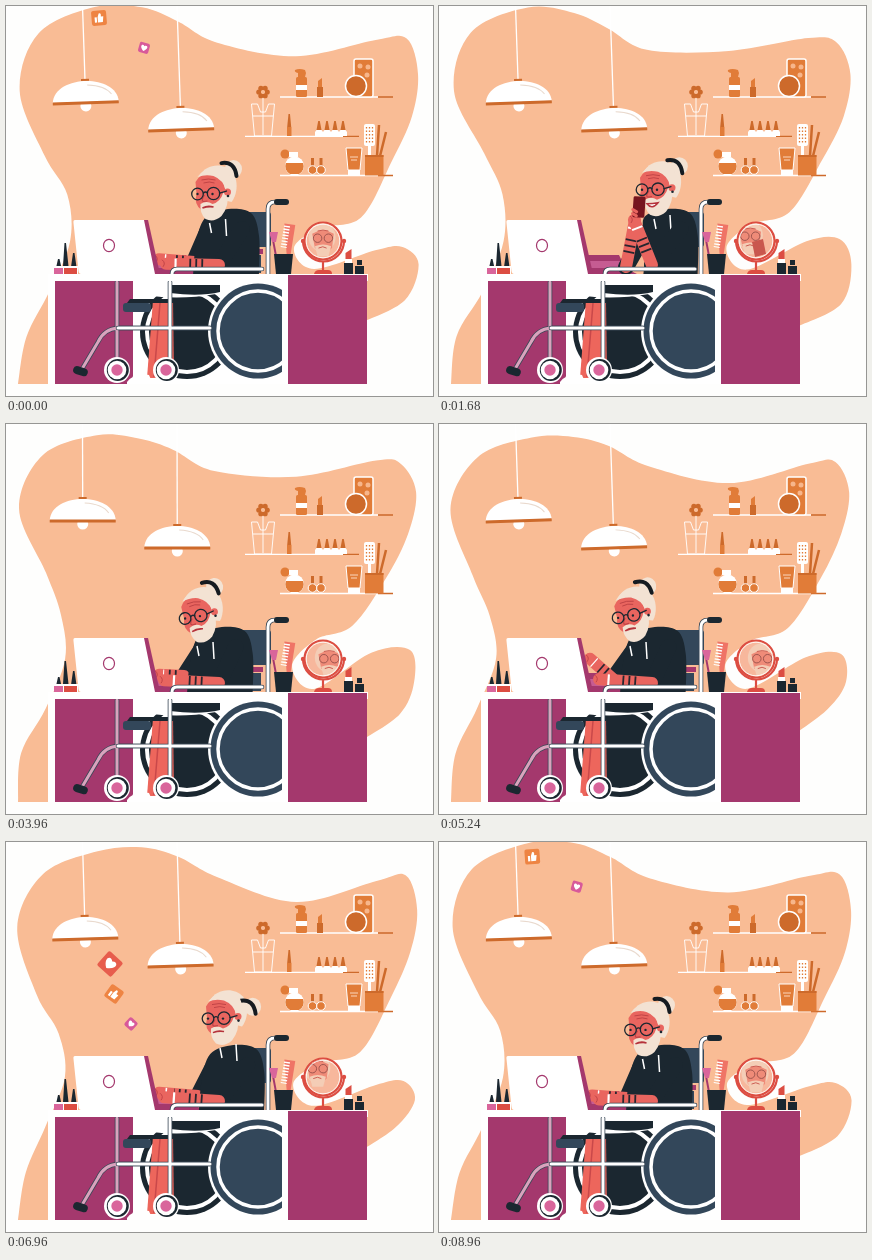
Recreate the animation shown at these times as an HTML page. Size 427x390 px, loop 9000 ms.

```html
<!DOCTYPE html>
<html lang="en">
<head>
<meta charset="utf-8">
<title>At the desk</title>
<style>
html, body { margin: 0; width: 100%; height: 100%; overflow: hidden; background: #fefefd; }
svg { display: block; width: 427px; height: 390px; }
.peach { fill: #f9bc95; }
.white { fill: #fff; }
.plum { fill: #a4386d; }
.navy { fill: #1b2730; }
.slate { fill: #33475a; }
.skin { fill: #e9655f; }
.hair { fill: #f3e2d3; }
.orange { fill: #e17c38; }
.rust { fill: #cd6a2b; }
.red { fill: #dc4d42; }
.line { fill: none; stroke: #fff; }
.tube, .core { fill: none; stroke-linecap: round; stroke-linejoin: round; }
.tube { stroke: #3a4856; stroke-width: 4.6; }
.core { stroke: #fff; stroke-width: 3; }
.ink { fill: none; stroke: #1b2730; stroke-width: 1.3; stroke-linecap: round; }
</style>
</head>
<body>
<svg viewBox="0 0 427 390">
  <defs>
    <g id="shade">
      <circle class="white" cy="26" r="5.5"/>
      <path class="white" d="M-33 22C-31-6 31-6 33 22z"/>
      <path class="rust" d="M-4-1h8v2h-8zM-33 21.500h66v3h-66z"/>
      <path d="M2 5Q20 6 26 15" fill="none" stroke="#e9d9cd"/>
    </g>
    <path id="heart" class="white" d="M0 5C-9-1-4-7 0-3C4-7 9-1 0 5z"/>
    <path id="thumb" class="white" d="M-5-1h2.500v6H-5zM-1.500-1L0-5Q3-6 2.200-1.500H5L4 5h-5.500z"/>
    <g id="caster">
      <circle class="white" r="13"/><circle class="navy" cx=".8" r="11"/>
      <circle class="white" r="9.300"/><circle r="5.700" fill="#d9659b"/>
    </g>
    <g id="polish">
      <path class="rust" d="M-.8-15h1.600l1.700 9h-5z"/><path class="white" d="M-2.500-6h5l1.500 2v4h-8v-4z"/>
    </g>
    <g id="drop">
      <path class="rust" d="M-1.500-17h3v8h-3z"/>
      <circle class="orange" cy="-5" r="4.300" stroke="#fff"/>
    </g>
    <clipPath id="glass"><circle cx="317" cy="235" r="17.500"/></clipPath>
  </defs>

  <path id="blob" class="peach"/>
  <g id="lamps"></g>

  <g id="shelves">
    <path class="line" d="M274 91h98M239 130.300h98M274 169.500h98" stroke-width="1.300"/>
    <path d="M372 91h15M337 130.300h16M372 169.500h15" stroke="#cd6a2b" stroke-width="1.300"/>
    <rect class="orange" x="290" y="71" width="11" height="20" rx="1.500"/>
    <path class="orange" d="M292 71v-4q-4-1-3-3 4-2 10 0l1 3-1 4z"/>
    <path class="white" d="M290 79h11v5h-11z"/>
    <path class="rust" d="M311 81h6v10h-6z"/><path class="orange" d="M312 81v-6l4-3v9z"/>
    <rect class="orange" x="348" y="53" width="19" height="38" rx="2" stroke="#fff" stroke-width="1.500"/>
    <g fill="#f7b68b"><circle cx="354" cy="60" r="2.500"/><circle cx="362" cy="61" r="2.500"/><circle cx="361" cy="69" r="2.500"/></g>
    <circle class="rust" cx="350" cy="80" r="10.500" stroke="#fff" stroke-width="1.500"/>

    <path class="line" d="M257 90V129M245.500 98h6l3 8h5l3-8h6l-3 32h-17zM247 110h20" stroke-width=".9"/>
    <g id="flower" class="rust"></g><circle class="peach" cx="257" cy="86" r="2"/>
    <path class="rust" d="M282.500 108h1.500l1.200 13h-4z"/><path class="orange" d="M281 121h4.500v9H281z"/>
    <g id="polishes"></g>

    <circle class="orange" cx="279" cy="148" r="4.500"/>
    <path class="white" d="M283 146h9v5h-9z"/>
    <circle class="white" cx="288.500" cy="160" r="9.500"/>
    <path class="orange" d="M280 157h17a8.500 8.500 0 0 1-4 11h-9a8.500 8.500 0 0 1-4-11z"/>
    <use href="#drop" x="306.500" y="169"/><use href="#drop" x="315" y="169"/>
    <path class="orange" d="M340 142h16l-2 22h-12z" stroke="#fff"/><path class="white" d="M342 164h12v5h-12z"/>
    <path d="M344 151h8M345 154h6" stroke="#fbd6bd"/>
    <rect class="white" x="358" y="118" width="11" height="22" rx="2"/>
    <path d="M360.500 121v17M363.500 121v17M366.500 121v17" stroke="#e17c38" stroke-width="1.300" stroke-dasharray="1.500 2"/>
    <path class="white" d="M362 140h3v10h-3z"/>
    <path d="M371 150l2-31M374 150l6-24" stroke="#cd6a2b" stroke-width="2.500"/>
    <path class="orange" d="M359 149h18.500v20.500H359z"/><path class="rust" d="M359 149h18.500v2H359z"/>
  </g>

  <g id="icons"></g>

  <g id="chairBack">
    <rect class="slate" x="232" y="206" width="33" height="35" rx="3"/>
    <path class="plum" d="M235 243h22v5h-22z"/>
    <path class="slate" d="M237 249h18v18h-18z"/>
    <path class="tube" d="M262 272V203Q262 196 269 196h4"/><path class="core" d="M262 272V203Q262 196 269 196h4"/>
    <rect class="navy" x="268" y="193" width="15" height="6" rx="3"/>
  </g>

  <path class="plum" d="M143 249h37l3 6h-38zM148 262h38l12 6h-49z"/>
  <path d="M145 255h38l3 7h-40z" fill="#c65c92"/>

  <g id="farArm"></g>
  <path id="body" class="navy"/>
  <g id="head">
    <path class="hair" d="M-6-18C0-30 18-32 27-22C34-12 31 2 26 8L18 6z"/>
    <g id="bun">
      <ellipse class="hair" cx="3" cy="1" rx="8.500" ry="9"/>
      <path d="M-9-5Q4-7 6 8" fill="none" stroke="#151b21" stroke-width="4" stroke-linecap="round"/>
    </g>
    <path class="skin" d="M-10-12Q-6-20 4-21L16-16Q21-8 20 8L14 18-4 16Q-12 10-9 0z"/>
    <path class="hair" d="M-8-17Q2-30 18-26Q28-20 26-3L20-4Q18-14 8-18Q0-20-8-17z"/>
    <path class="hair" d="M-5 10Q1 6 7 10Q15 8 18-2H22Q24 12 16 22Q8 29 0 25Q-6 19-5 10z"/>
    <circle class="skin" cx="22" cy="-2" r="3.500"/><circle class="navy" cx="22.500" cy="2" r="1.300"/>
    <path d="M-4-14q7-2 14 0M-2-11q6-2 11 0" fill="none" stroke="#bd4144" stroke-width=".9"/>
    <path d="M-1 1Q-5 7-2 7.500L2 7" fill="none" stroke="#c14347" stroke-width="1.200"/>
    <circle class="ink" cx="-8" r="5.800"/><circle class="ink" cx="8" cy="-.5" r="6.200"/>
    <path class="ink" d="M-2-1Q0-3 2-1M14-1l7-2"/>
    <circle class="navy" cx="-8" r="1.200"/><circle class="navy" cx="7" r="1.200"/>
    <path id="mouth" fill="#fff" stroke="#b5323b" stroke-width="1.500"/>
  </g>
  <path id="strings" class="line" stroke-width="1.500"/>
  <g id="nearArm"></g>
  <g id="phone">
    <rect x="-6" y="-10.500" width="12" height="21" rx="1.500" fill="#76151f"/>
    <path d="M-6 3l4 2M-6 7l4 2" stroke="#e9655f" stroke-width="3" stroke-linecap="round"/>
  </g>

  <path class="plum" d="M136 214h6l12 54h-8z"/>
  <path class="white" d="M69 214h69l11 54H75Q73 268 72.500 265L67.500 217Q67 214 69 214z"/>
  <ellipse cx="103" cy="239.500" rx="5.500" ry="6.200" fill="none" stroke="#a4386d" stroke-width="1.200"/>

  <path class="tube" d="M166 274V268Q166 263 171 263H256"/><path class="core" d="M166 274V268Q166 263 171 263H256"/>

  <path class="white" d="M127 275H278V378H127z"/>
  <path class="plum" d="M49 275h78v103H49z"/>
  <g id="chair">
    <circle class="navy" cx="181" cy="326" r="47"/>
    <circle class="line" cx="181" cy="326" r="40" stroke-width="4"/>
    <path class="white" d="M146 274h64v14q-34 6-64 2z"/>
    <path class="navy" d="M164 279h50v7q-20 5-50 1z"/>
    <circle class="white" cx="252" cy="325" r="50"/>
    <circle class="slate" cx="252" cy="325" r="47.500"/>
    <circle class="line" cx="252" cy="325" r="40" stroke-width="3.500"/>
    <path class="tube" d="M111 276V352M76 363L92 336Q98 323 112 322H204"/>
    <path class="core" d="M111 276V352M76 363L92 336Q98 323 112 322H204" style="stroke:#d9a3bd"/>
    <path d="M147 294h20l1 78h-27z" fill="#ed665c"/>
    <path d="M154 297l-6 74" stroke="#c9484a" stroke-width="1.500"/>
    <rect class="slate" x="117" y="297" width="28" height="9" rx="3"/><path class="navy" d="M121 297h46v-4h-43z"/>
    <path class="tube" d="M164 276V352M112 322H204"/><path class="core" d="M164 276V352M112 322H204"/>
    <rect class="navy" x="67" y="361" width="15" height="8" rx="4" transform="rotate(18 74 365)"/>
    <use href="#caster" x="111" y="364"/><use href="#caster" x="160" y="364"/>
    <path class="white" d="M121 376q8-10 22-7l4 9h-26z"/>
  </g>
  <path class="white" d="M42 268H362v7H282V378h-6V275H49V378H42z"/>
  <path class="plum" d="M282 269h79V378H282z"/>

  <g id="deskItems">
    <path class="navy" d="M57 260l1.500-23h1.500l2.500 23zM65 261l2-14h1.500l2 14zM50 262l2-9h1.500l2 9z"/>
    <path class="white" d="M48 260h24v8H48z"/>
    <path class="red" d="M58 262h13v6H58z"/><path d="M48 262h9v6h-9z" fill="#d9659b"/>
    <path d="M270 250l-3-16" stroke="#a4386d" stroke-width="2"/><path d="M263 226h9l-2 10h-4z" fill="#d9659b"/>
    <g transform="rotate(9 281 233)">
      <path d="M276 218h11v30h-4z" fill="#ef7466"/>
      <path d="M279 220v22" stroke="#fff" stroke-width="6" stroke-dasharray="1.400 1.600"/>
    </g>
    <path class="navy" d="M268 248h19l-2 20h-15z"/>
    <path d="M297 235A20.500 20.500 0 0 0 338 235M317 255v10" fill="none" stroke="#dc4d42" stroke-width="2.200"/>
    <path class="red" d="M308 268q1-4 5-4h9q4 0 4 4z"/>
    <circle cx="317" cy="235" r="18.500" fill="#f7b79c" stroke="#dc4d42" stroke-width="2.200"/>
    <g clip-path="url(#glass)">
      <g id="reflection">
        <ellipse cx="-1" cy="-3" rx="15" ry="16" fill="#f4cdb6"/>
        <path d="M-12-7Q0-14 12-7L10 9Q1 18-9 9z" fill="#ef8b78"/>
        <path d="M-9 7Q0 3 9 7L6 18H-6z" fill="#f4cdb6"/>
        <path d="M-5 9q5-3 9 0M-6-10q6-2 12 0" fill="none" stroke="#c85249"/>
        <circle cx="-6" cy="-2" r="4.700" fill="none" stroke="#96504a"/><circle cx="6" cy="-2" r="4.700" fill="none" stroke="#96504a"/>
      </g>
      <path id="mirrorPhone" d="M313 236l11-3 3 15-11 3z" fill="#c9574e"/>
    </g>
    <circle class="line" cx="317" cy="235" r="16.800" stroke-width=".9"/>
    <circle class="red" cx="297" cy="235" r="2.200"/><circle class="red" cx="338" cy="235" r="2.200"/>
    <path class="navy" d="M338 257h9v11h-9z"/><path class="white" d="M339 253h7v4h-7z"/><path class="red" d="M339.500 253v-6l6-4v10z"/>
    <path class="navy" d="M349 260h9v8h-9zM351 254h5v5h-5z"/>
  </g>
</svg>
<script>
const LOOP = 9000;
const $ = id => document.getElementById(id);
const lerp = (a, b, k) => a + (b - a) * k;
const mix = (a, b, k) => a.map((v, i) => lerp(v, b[i], k));
const ease = k => k * k * (3 - 2 * k);
const rad = deg => deg * Math.PI / 180;
const wave = (t, turns, deg = 0) => Math.cos(t / LOOP * turns * 2 * Math.PI - rad(deg));
const place = (id, ...steps) => $(id).setAttribute('transform', steps.join(' '));
const repeat = (n, make) => Array.from({ length: n }, (_, i) => make(i)).join('');

// Smooth curve through points.
function curve(pts) {
  const at = i => pts[Math.max(0, Math.min(pts.length - 1, i))];
  let d = 'M' + pts[0];
  for (let i = 0; i < pts.length - 1; i++) {
    const [p, a, b, q] = [at(i - 1), at(i), at(i + 1), at(i + 2)];
    d += `C${a[0] + (b[0] - p[0]) / 6} ${a[1] + (b[1] - p[1]) / 6} ${b[0] - (q[0] - a[0]) / 6} ${b[1] - (q[1] - a[1]) / 6} ${b}`;
  }
  return d;
}

// Knots swing along their outward normal: x, y, reach, phase in degrees.
const knots = [
  [12, 378, 0, 0], [18, 330, 3, 150], [41, 285, 3, 220], [61, 235, 4, 220], [57, 190, 7, 230], [38, 150, 8, 265], [13, 85, 2, 250],
  [35, 30, 5, 45], [90, 7, 7, 30], [135, 8, 7, 345], [170, 20, 7, 315], [210, 41, 7, 310], [290, 53, 8, 70], [370, 36, 4, 60],
  [398, 36, 5, 330], [411, 68, 1, 0], [404, 110, 2, 0], [383, 155, 3, 330], [351, 207, 7, 330], [312, 219, 4, 330],
  [287, 242, 1, 0], [308, 264, 1, 0], [368, 237, 9, 145], [400, 234, 9, 150], [410, 258, 3, 30], [395, 291, 10, 60], [354, 316, 6, 80]];

function drawBlob(t) {
  const pts = knots.map(([x, y, reach, phase], i) => {
    const [a, b] = [knots[Math.max(0, i - 1)], knots[Math.min(knots.length - 1, i + 1)]];
    const [dx, dy] = [b[0] - a[0], b[1] - a[1]];
    const push = reach * wave(t, 1, phase) / Math.hypot(dx, dy);
    return [x + dy * push, y - dx * push];
  });
  $('blob').setAttribute('d', curve(pts) + 'V378Z');
}

const lamps = [{ x: 76.5, cord: 74 }, { x: 171, cord: 101 }];
$('lamps').innerHTML = lamps.map(({ cord }, i) =>
  `<g id="lamp${i}"><path class="line" stroke-width="1.300" d="M0-9V${cord}"/><use href="#shade" y="${cord}"/></g>`).join('');

function drawLamps(t) {
  lamps.forEach(({ x }, i) => place('lamp' + i, `translate(${x} 0)`, `rotate(${-2 * wave(t, 5, -14)})`));
}

$('flower').innerHTML = repeat(6, i =>
  `<circle cx="${257 + 4.2 * Math.cos(rad(i * 60))}" cy="${86 + 4.2 * Math.sin(rad(i * 60))}" r="2.6"/>`);
$('polishes').innerHTML = repeat(4, i => `<use href="#polish" x="${313 + i * 8}" y="130"/>`);

const icons = [
  { x: 104, y: 122, drift: -9, size: 19, turn: [42, 10], color: '#e75d4d', mark: 'heart' },
  { x: 108, y: 152, drift: -15, size: 15, turn: [36, -5], color: '#ee8443', mark: 'thumb' },
  { x: 125, y: 182, drift: 13, size: 10.5, turn: [42, 16], color: '#d8599a', mark: 'heart' }];
$('icons').innerHTML = icons.map(({ size: s, color, mark }, i) =>
  `<g id="icon${i}"><rect x="${-s / 2}" y="${-s / 2}" width="${s}" height="${s}" rx="2" fill="${color}"/>
  <use href="#${mark}" transform="scale(${s / 17})"/></g>`).join('');

// Icons rise from behind the laptop and cross the loop's seam.
function drawIcons(t) {
  const k = ((t < 2000 ? t + LOOP : t) - 6960) / 2040;
  icons.forEach((icon, i) => {
    const y = icon.y - 140 * k;
    $('icon' + i).style.display = y < 238 && y > -20 ? '' : 'none';
    place('icon' + i, `translate(${icon.x + icon.drift * k} ${y})`, `rotate(${lerp(...icon.turn, k)})`);
  });
}

// Head x, y, turn; bun angle; near hand; far elbow; far hand.
const rest = [199.5, 188, 0, -46, 160, 257, 188, 256, 153, 254];
const selfie = [211, 184, 0, -43, 195, 214, 187, 261, 196, 214];
const closer = [214, 184, 4, -46, 200, 211, 158, 243, 196, 206];
const typing = [187, 193, -9, -50, 158, 256, 178, 252, 153, 251];
const raised = [187, 193, -9, -50, 160, 256, 174, 255, 151, 234];
const upright = [210, 177, 0, -21, 158, 255, 192, 254, 153, 251];
const timeline = [[0, rest], [800, rest], [1350, selfie], [1950, selfie], [2350, closer], [3000, closer], [3500, typing],
  [4700, typing], [5000, raised], [5500, raised], [5900, typing], [6500, upright], [7700, upright], [8400, rest], [LOOP, rest]];

function poseAt(t) {
  const i = timeline.findIndex(([time]) => time > t);
  const [[t0, a], [t1, b]] = [timeline[i - 1], timeline[i]];
  return mix(a, b, ease((t - t0) / (t1 - t0)));
}

function arm(sx, sy, ex, ey, hx, hy) {
  const on = k => `${lerp(ex, hx, k)} ${lerp(ey, hy, k)}`;
  const bar = (from, to, color, width, more = '') =>
    `<path d="M${from}L${to}" stroke="${color}" stroke-width="${width}" ${more}/>`;
  const round = 'stroke-linecap="round"';
  return bar(`${sx} ${sy}`, `${ex} ${ey}`, '#1b2730', 16, round) +
    bar(on(0), on(1), '#e9655f', 12, round) +
    bar(on(.3), on(.62), '#26262f', 11, 'stroke-dasharray="1.8 4.2"') +
    bar(on(.8), on(.84), '#fff', 11) +
    `<path d="M${hx - 4} ${hy - 4}q4 3 1 7" fill="none" stroke="#c14347"/>`;
}

function drawPerson(t) {
  const [x, y, turn, bun, hx, hy, ex, ey, fx, fy] = poseAt(t);
  const lift = Math.max(0, (257 - hy) / 45);
  const mid = 222 + (x - 199.5) / 2;
  const left = mid + 12 * lift;
  const tap = .8 * wave(t, 30) * (1 - Math.min(1, lift));

  place('head', `translate(${x} ${y + .4 * wave(t, 10, 90)})`, `rotate(${turn})`);
  place('bun', `translate(${36 * Math.cos(rad(bun))} ${36 * Math.sin(rad(bun))})`);
  $('mouth').setAttribute('d', `M-3 14Q2 ${11 + 10 * lift} 8 13Q3 ${12 + 2 * lift}-3 14z`);
  $('body').setAttribute('d', curve([[left - 35, 270], [left - 32, 238], [mid - 23, 212], [mid, 203],
    [mid + 23, 207], [mid + 31, 230], [mid + 31, 270]]) + 'Z');
  $('strings').setAttribute('d', `M${x + 4} ${y + 29}l2 10M${x + 20} ${y + 25}l1 17`);
  $('farArm').innerHTML = arm(mid - 21, 226, ex, ey, fx, fy - tap);
  $('nearArm').innerHTML = arm(mid + 14, 223, 213, 259, hx, hy + tap);

  $('phone').style.display = $('mirrorPhone').style.display = lift > .3 ? '' : 'none';
  place('phone', `translate(${hx + 5} ${hy - 13})`, `rotate(${4 + turn * 2})`);
  place('reflection', `translate(${317 - (x - 199.5) / 2} ${233 + (y - 186) / 2})`, 'scale(.9)');
}

function draw(now) {
  const t = now % LOOP;
  [drawBlob, drawLamps, drawIcons, drawPerson].forEach(part => part(t));
}

const start = performance.now();
function tick() {
  draw(performance.now() - start);
  requestAnimationFrame(tick);
}
tick();
</script>
</body>
</html>
```
